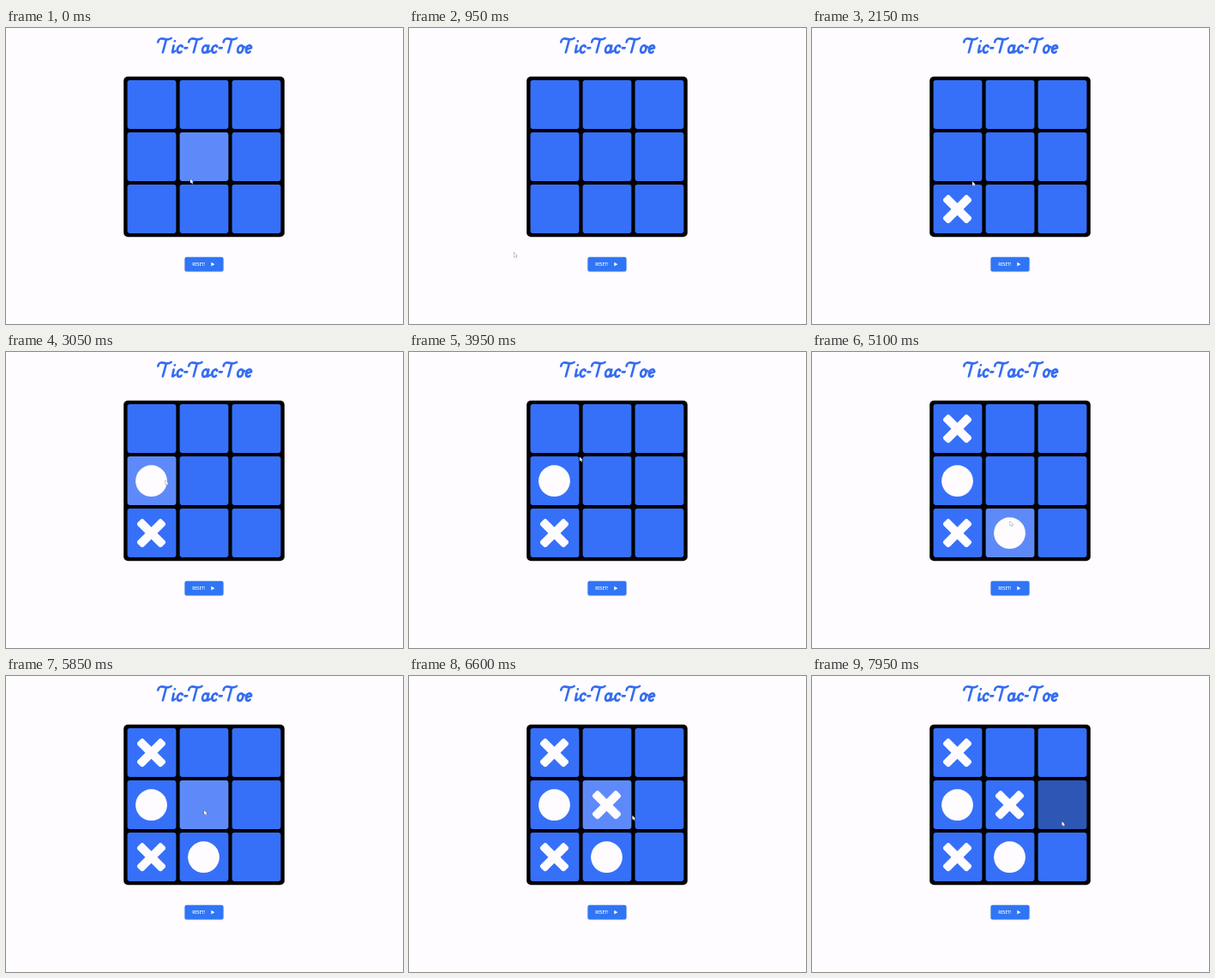
These frames come from a looping animation (463 by 346 pixels, 8 s). An HTML page with a canvas:

```html
<!DOCTYPE html>
<html lang="en">
<head>
<meta charset="utf-8">
<title>Tic-Tac-Toe</title>
<style>
  html, body { margin: 0; width: 100%; height: 100%; overflow: hidden; background: #fefcff; }
  canvas { display: block; position: absolute; left: 0; top: 0; }
  h1 {
    position: absolute; left: 176px; top: 8px; width: 111px; margin: 0;
    font: italic 700 19px/26px Lato, sans-serif; text-align: center;
    white-space: nowrap; color: transparent;
  }
</style>
</head>
<body>
<canvas id="stage" width="463" height="346"></canvas>
<h1>Tic-Tac-Toe</h1>
<script>
const ctx = document.getElementById('stage').getContext('2d');
const LOOP = 8000, STEP = 50, HOVER_LAG = 50, HOLD = 100;
const PAPER = '#fefcff', BLUE = '#3670f9', HOVER = '#5e8af9', PRESS = '#2e56b5';
const CX = 231, CY = 150.5, CELL = 56.8, PITCH = 61, BOARD = 187.6;

// Where the pointer rests or turns; it eases from one stop to the next
const stops = [
  { t: 0, x: 215, y: 176.5 },
  { t: 600, x: 67, y: 280 },
  { t: 950, x: 122.5, y: 262.5 },
  { t: 1300, x: 172, y: 216, stay: 450 },
  { t: 2150, x: 187, y: 179.3 },
  { t: 2500, x: 186, y: 150, stay: 900 },
  { t: 3950, x: 199, y: 122.5 },
  { t: 4250, x: 174, y: 96, stay: 200 },
  { t: 4900, x: 231, y: 198, stay: 300 },
  { t: 5700, x: 231, y: 157, stay: 600 },
  { t: 6600, x: 260.5, y: 163 },
  { t: 7000, x: 291.5, y: 170, stay: 1000 }
];

// Clicks in turn; crosses and noughts alternate
const moves = [
  { t: 1400, col: 0, row: 2 }, { t: 2750, col: 0, row: 1 }, { t: 4300, col: 0, row: 0 },
  { t: 4950, col: 1, row: 2 }, { t: 6000, col: 1, row: 1 }, { t: 7900, col: 2, row: 1 }
];

const smooth = f => f * f * (3 - 2 * f);
const clamp = f => Math.min(1, Math.max(0, f));

function pointer(t) {
  const i = stops.findLastIndex(s => s.t <= t);
  const a = stops[i], b = stops[i + 1] || a;
  const leave = a.t + (a.stay || 0);
  const f = b === a ? 0 : smooth(clamp((t - leave) / (b.t - leave)));
  return [a.x + (b.x - a.x) * f, a.y + (b.y - a.y) * f];
}

function box(x, y, w, h, r, color) {
  ctx.fillStyle = color;
  ctx.beginPath();
  ctx.roundRect(x, y, w, h, r);
  ctx.fill();
}

function line(x0, y0, x1, y1) {
  ctx.moveTo(x0, y0);
  ctx.lineTo(x1, y1);
}

// Script lettering: slanted bowls, stems and tails on a baseline at y = 0
function bowl(x, from = 0, to = Math.PI * 2) {
  ctx.moveTo(x + 3 * Math.cos(from), -4.3 + 4.3 * Math.sin(from));
  ctx.ellipse(x, -4.3, 3, 4.3, 0, from, to, to < from);
}

function stem(x) {
  line(x, -8.4, x, -2);
  ctx.quadraticCurveTo(x, 1.2, x + 3, -2);
}

const glyphs = {
  T: { width: 15.1, draw() {
    ctx.moveTo(-1.6, -12.4);
    ctx.bezierCurveTo(-1.6, -18, 3, -16.4, 6, -15.8);
    ctx.quadraticCurveTo(10.5, -15, 12.8, -17);
    line(7.4, -15.2, 6.4, -0.4);
  } },
  i: { width: 6.2, draw() { stem(2.4); line(2.6, -13.6, 2.7, -13.6); } },
  c: { width: 9.4, draw() { bowl(4.4, -0.7, -5.5); } },
  '-': { width: 5.2, draw() { line(0.2, -5.6, 3, -5.6); } },
  a: { width: 10.8, draw() { bowl(4); stem(7.2); } },
  o: { width: 9.7, draw() { bowl(4.6); line(6, -7.6, 9, -6.6); } },
  e: { width: 10, draw() { line(2, -3.6, 6.8, -5.6); bowl(4.6, -0.3, -5.5); } }
};

function drawTitle() {
  ctx.save();
  ctx.translate(176.4, 28.9);
  ctx.transform(1, 0, -0.2, 1, 0, 0);
  ctx.strokeStyle = '#356df0';
  ctx.lineWidth = 2.7;
  ctx.lineCap = ctx.lineJoin = 'round';
  for (const ch of 'Tic-Tac-Toe') {
    ctx.beginPath();
    glyphs[ch].draw();
    ctx.stroke();
    ctx.translate(glyphs[ch].width, 0);
  }
  ctx.restore();
}

function drawCross(x, y) {
  ctx.save();
  ctx.translate(x, y);
  for (const turn of [1, 2]) {
    ctx.rotate(turn * Math.PI / 4);
    box(-20, -5, 40, 10, 3, PAPER);
    ctx.rotate(turn === 1 ? Math.PI / 4 - Math.PI / 4 : 0);
  }
  ctx.restore();
}

function drawNought(x, y) {
  ctx.fillStyle = PAPER;
  ctx.beginPath();
  ctx.arc(x, y, 18.4, 0, Math.PI * 2);
  ctx.fill();
}

function drawBoard(t) {
  box(CX - BOARD / 2, CY - BOARD / 2, BOARD, BOARD, 5, '#000');
  const [px, py] = pointer(Math.max(0, t - HOVER_LAG));
  for (let row = 0; row < 3; row++) {
    for (let col = 0; col < 3; col++) {
      const x = CX + (col - 1) * PITCH, y = CY + (row - 1) * PITCH;
      const over = Math.max(Math.abs(px - x), Math.abs(py - y)) <= CELL / 2;
      const turn = moves.findIndex(m => m.col === col && m.row === row);
      const age = turn < 0 ? -1 : t - moves[turn].t;
      const held = age >= 0 && age < HOLD;
      box(x - CELL / 2, y - CELL / 2, CELL, CELL, 2.8, held ? PRESS : over ? HOVER : BLUE);
      if (age >= HOLD) (turn % 2 ? drawNought : drawCross)(x - 0.5, y + 0.2);
    }
  }
}

function drawButton() {
  ctx.save();
  ctx.shadowColor = 'rgba(40, 60, 110, .35)';
  ctx.shadowBlur = 1.5;
  ctx.shadowOffsetY = 0.5;
  box(208.5, 267.8, 45, 16.8, 2, '#2f75f6');
  ctx.restore();
  ctx.fillStyle = '#fff';
  ctx.font = '600 4.7px "Open Sans", sans-serif';
  ctx.fillText('RESET!', 217.2, 278);
  ctx.beginPath();
  ctx.moveTo(239.3, 273.8);
  ctx.lineTo(243.4, 276.2);
  ctx.lineTo(239.3, 278.6);
  ctx.fill();
}

const arrow = new Path2D('M0 0V5L1.2 4L2.2 6L3 5.6L2.2 3.7H3.7Z');

function drawPointer(t) {
  ctx.save();
  ctx.translate(...pointer(t));
  ctx.fillStyle = '#fff';
  ctx.strokeStyle = 'rgba(40, 40, 50, .75)';
  ctx.lineWidth = 0.6;
  ctx.stroke(arrow);
  ctx.fill(arrow);
  ctx.restore();
}

function draw(t) {
  ctx.fillStyle = PAPER;
  ctx.fillRect(0, 0, 463, 346);
  drawTitle();
  drawBoard(t);
  drawButton();
  drawPointer(t);
}

const start = performance.now();
function tick() {
  const t = (performance.now() - start) % LOOP;
  draw(Math.floor(t / STEP) * STEP);
  requestAnimationFrame(tick);
}
tick();
</script>
</body>
</html>
```
